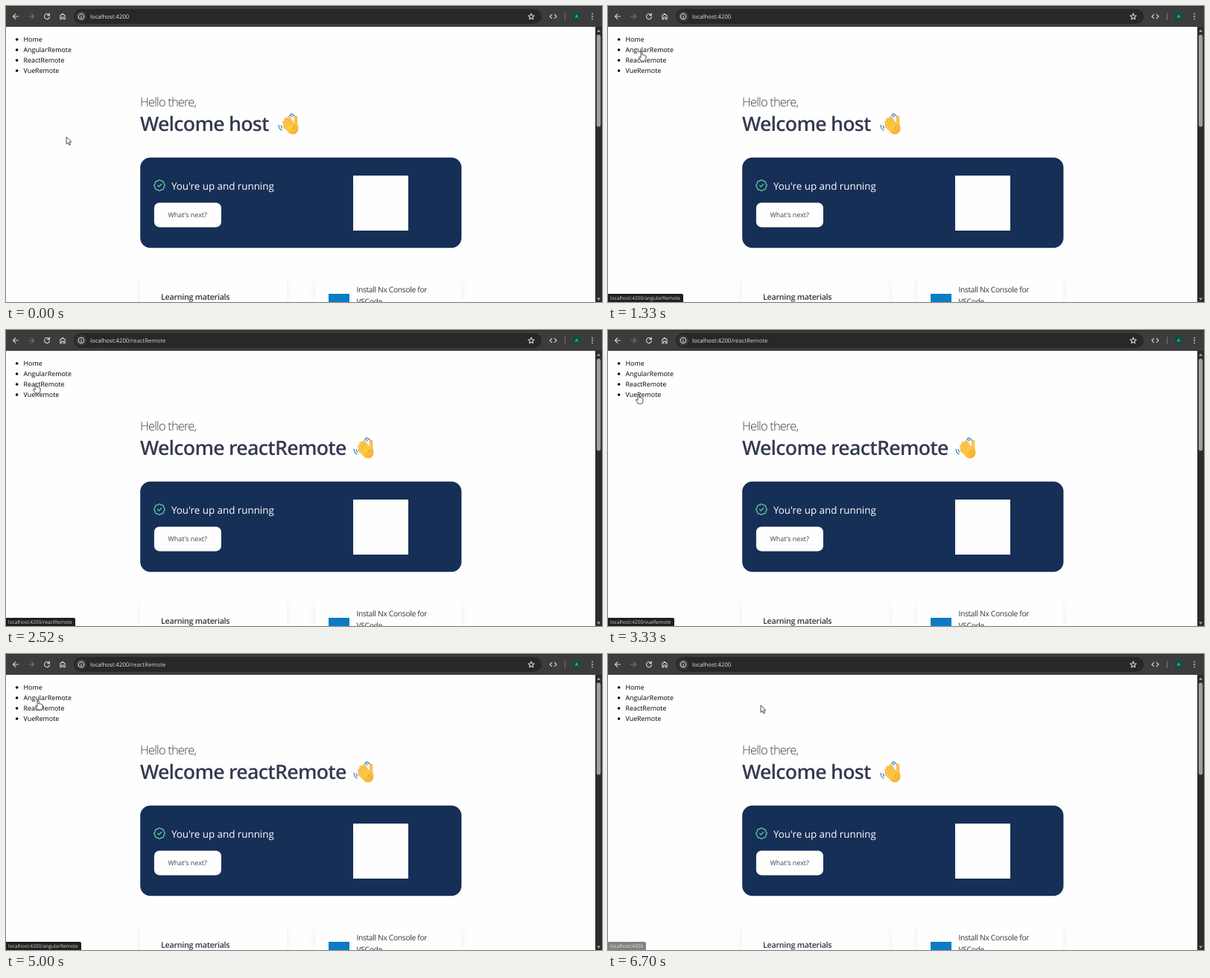
Write an HTML page that moves like this. It is 800x398 px and loops after 6730 ms.

```html
<!DOCTYPE html>
<html lang="en">
<head>
<meta charset="utf-8">
<title>Remote navigation</title>
<style>
  html, body { margin: 0; width: 100%; height: 100%; overflow: hidden; background: #fefefe; }
  svg { display: block; width: 800px; height: 398px; }
  text { font-family: "Open Sans", "Noto Sans", sans-serif; text-rendering: geometricPrecision; white-space: pre; }
  .line { fill: none; stroke: #d5d5d5; stroke-width: 1.1; stroke-linecap: round; stroke-linejoin: round; }
  .dim { stroke: #757575; }
  .card { fill: #fefefe; filter: drop-shadow(0 4px 4px rgba(0, 0, 0, .07)); }
  .pointer { fill: #fff; stroke: #222; stroke-width: .8; stroke-linejoin: round; }
</style>
</head>
<body>
<svg viewBox="0 0 800 398">
  <defs>
    <linearGradient id="skin" x1="0" y1="0" x2="1" y2="1">
      <stop offset=".3" stop-color="#ffc943"/>
      <stop offset="1" stop-color="#f3a52c"/>
    </linearGradient>
  </defs>
  <rect width="800" height="398" fill="#fefefe"/>

  <g id="toolbar">
    <rect width="800" height="28" fill="#3c3c3c"/>
    <rect width="800" height="1" fill="#303030"/>
    <rect x="91" y="4" width="628" height="20" rx="10" fill="#282828"/>
    <circle cx="101" cy="14" r="7" fill="#3c3c3c"/>
    <g class="line">
      <path d="M16.5 14H9.5M12.8 10.7L9.5 14L12.8 17.3"/>
      <path class="dim" d="M30.5 14H37.5M34.2 10.7L37.5 14L34.2 17.3"/>
      <path d="M58 12.2A3.5 3.5 0 1 0 58.5 14.6M58.4 10V12.6H55.8"/>
      <path d="M72.8 13L76 10.3L79.2 13V17.8H77.3V15H74.7V17.8H72.8Z"/>
      <circle cx="101" cy="14" r="3.7"/>
      <path d="M101 13.8V16M101 12V12.1"/>
      <path id="star"/>
      <path d="M732.7 11.3L730 14L732.7 16.7M736.3 11.3L739 14L736.3 16.7"/>
      <path class="dim" d="M750.5 9.5V18.5"/>
    </g>
    <circle cx="766" cy="14" r="6" fill="#0c5044"/>
    <text x="766" y="16.2" font-size="6" fill="#cfe3dd" text-anchor="middle">A</text>
    <g fill="#d5d5d5"><circle cx="787" cy="10.7" r=".9"/><circle cx="787" cy="14" r=".9"/><circle cx="787" cy="17.3" r=".9"/></g>
    <text x="113" y="16.9" font-size="7.75" fill="#e6e6e6">localhost:4200<tspan id="path" fill="#cfcfcf"></tspan></text>
  </g>

  <g id="links" font-size="8.9" fill="#000"></g>

  <text x="180" y="134.5" font-size="16.5" font-weight="300" letter-spacing="-.85" fill="#3c3f4a">Hello there,</text>
  <text id="title" x="180" y="168" font-size="26.7" font-weight="600" letter-spacing="-.73" fill="#333a4f"></text>

  <g id="wave" fill="none" stroke-linecap="round">
    <g id="fingers"></g>
    <path d="M11.5 21Q13 27.5 19 28.6Q24.5 28.8 26.8 24Q28.4 20 26.6 15.5L22 14.5L15 17Z" fill="url(#skin)"/>
    <path d="M19.6 21.5Q20 18 23.6 16.6" stroke="#d98e25" stroke-width=".8"/>
    <path d="M1 16Q1.2 21 5.2 23M4 16.5Q4.2 19 6 20.2M16.8 1.2Q20.3 .8 22 4M15.5 3.2Q18 2.8 19.3 5" stroke="#3e7fb8" stroke-width="1.2"/>
  </g>

  <rect x="180.2" y="203.8" width="431.2" height="121.5" rx="13.5" fill="#162f56"/>
  <g id="badge" fill="none" stroke="#5cc3a0" stroke-linecap="round" stroke-linejoin="round">
    <path id="scallop"/>
    <path d="M203.5 241.3L205.3 243L208.6 239.6"/>
  </g>
  <text x="222" y="247" font-size="13.35" fill="#fff">You're up and running</text>
  <rect x="198.9" y="264.4" width="90" height="33" rx="7" fill="#fefefe"/>
  <text x="217.5" y="284.3" font-size="8.95" fill="#374151">What's next?</text>
  <rect x="466" y="228" width="74" height="74" fill="#fefefe"/>

  <rect class="card" x="180" y="361" width="197" height="60" rx="6.7"/>
  <rect class="card" x="415" y="361" width="196" height="60" rx="6.7"/>
  <text x="208" y="394.5" font-size="10.7" font-weight="600" letter-spacing="-.25" fill="#30353f">Learning materials</text>
  <rect x="433" y="387" width="28" height="28" fill="#0b7bc4"/>
  <g font-size="10.3" letter-spacing="-.35" fill="#30353f">
    <text x="470.5" y="384.7">Install Nx Console for</text>
    <text x="470.5" y="400.7">VSCode</text>
  </g>

  <rect x="791" y="28" width="9" height="370" fill="#2c2c2c"/>
  <rect x="792.8" y="38.5" width="5.4" height="124" rx="2.7" fill="#9f9f9f"/>
  <path d="M793 35H798L795.5 31.5ZM793 392.5H798L795.5 396Z" fill="#9f9f9f"/>

  <g id="status">
    <path id="statusBox" fill="#202020"/>
    <text id="statusText" x="3" y="395" font-size="6.57" fill="#d2d2d2"></text>
  </g>

  <path id="arrow" class="pointer" d="M0 0V9.6L2.3 7.6L3.8 11L5.4 10.3L3.9 7H6.8Z"/>
  <path id="hand" class="pointer" d="M-1 1Q0-.6 1 1V5Q2 4 2.9 5.2Q3.9 4.6 4.6 5.7Q5.8 5.4 6 6.8V9.5Q5.8 11.5 4.8 13H-.6Q-1.4 11-3.6 8.6Q-3.6 7-2.2 7.6L-1 8.6Z"/>
</svg>
<script>
const LOOP = 6730;
const $ = id => document.getElementById(id);

const pages = {
  host:    { path: '', waveX: 365, icon: 1.4, box: 51 },
  angular: { path: '/angularRemote', waveX: 498.5, icon: 1.4, box: 101 },
  react:   { path: '/reactRemote', waveX: 466, icon: 1.4, box: 93 },
  vue:     { path: '/vueRemote', waveX: 450, icon: 0.9, box: 89 }
};

const pageTimes = [[0, 'host'], [1380, 'angular'], [2280, 'react'], [3400, 'vue'],
  [4580, 'react'], [5220, 'angular'], [5860, 'host']];
const statusTimes = [[0, null], [1000, 'angular'], [1680, 'react'], [2860, 'vue'],
  [4120, 'react'], [4800, 'angular'], [5480, 'host']];
const cursorStops = [[0, 81, 176], [80, 81, 176], [700, 55, 116], [1050, 45, 61], [1400, 45, 61],
  [1720, 40, 72], [2600, 40, 72], [2920, 41, 86], [3700, 41, 86], [4210, 45, 66],
  [4400, 45, 71], [4650, 45, 71], [4880, 43, 62], [5260, 43, 62], [5560, 36, 45],
  [6020, 36, 45], [6700, 205, 69]];

const clamp = v => Math.max(0, Math.min(1, v));
const smooth = v => v * v * (3 - 2 * v);
const current = (list, t) => list.filter(item => item[0] <= t).pop()[1];

function cursorAt(t) {
  const next = cursorStops.findIndex(stop => stop[0] > t);
  if (next < 0) return cursorStops[cursorStops.length - 1].slice(1);
  const [t0, x0, y0] = cursorStops[next - 1];
  const [t1, x1, y1] = cursorStops[next];
  const k = smooth((t - t0) / (t1 - t0));
  return [x0 + (x1 - x0) * k, y0 + (y1 - y0) * k];
}

function polar(cx, cy, count, radius) {
  const points = Array.from({ length: count }, (_, i) => {
    const a = i / count * 2 * Math.PI - Math.PI / 2;
    const r = radius(i, a);
    return (cx + r * Math.cos(a)).toFixed(2) + ' ' + (cy + r * Math.sin(a)).toFixed(2);
  });
  return 'M' + points.join('L') + 'Z';
}

$('star').setAttribute('d', polar(705, 14.3, 10, i => i % 2 ? 1.9 : 4.3));
$('scallop').setAttribute('d', polar(206, 241.2, 96, (_, a) => 6.8 + 0.4 * Math.cos(8 * a)));
$('links').innerHTML = ['Home', 'AngularRemote', 'ReactRemote', 'VueRemote'].map((name, i) =>
  `<circle cx="14.6" cy="${45 + 14 * i}" r="1.8"/><text x="23.5" y="${48 + 14 * i}">${name}</text>`).join('');
$('fingers').innerHTML = ['M24 18L24 6', 'M21 17L14.5 6.5', 'M19 19L10.5 8.5', 'M17 21L8.3 12.5', 'M16 24L8.8 17.5']
  .map(d => `<path d="${d}" stroke="#dd9728" stroke-width="4.3"/><path d="${d}" stroke="#ffca48" stroke-width="3.3"/>`).join('');

function draw(t) {
  const name = current(pageTimes, t);
  const page = pages[name];
  $('path').textContent = page.path;
  $('title').textContent = 'Welcome ' + (page.path.slice(1) || name);
  $('wave').setAttribute('transform', `translate(${page.waveX} 144)`);
  $('badge').setAttribute('stroke-width', page.icon);

  const target = pages[current(statusTimes, t)];
  $('status').setAttribute('opacity', target ? 1 - clamp((t - 6580) / 270) : 0);
  if (target) {
    $('statusBox').setAttribute('d', `M0 387H${target.box - 2}q2 0 2 2V398H0Z`);
    $('statusText').textContent = 'localhost:4200' + target.path;
  }

  const [x, y] = cursorAt(t);
  const row = Math.round((y - 45) / 14);
  const width = [25, 65, 54, 48][row];
  const hovering = width && x > 23 && x < 23 + width && Math.abs(y - 45 - 14 * row) < 5.5;
  for (const [id, shown] of [['arrow', !hovering], ['hand', hovering]]) {
    $(id).setAttribute('transform', `translate(${x.toFixed(2)} ${y.toFixed(2)})`);
    $(id).setAttribute('visibility', shown ? 'visible' : 'hidden');
  }
}

const start = performance.now();
function tick() {
  draw((performance.now() - start) % LOOP);
  requestAnimationFrame(tick);
}
tick();
</script>
</body>
</html>
```
